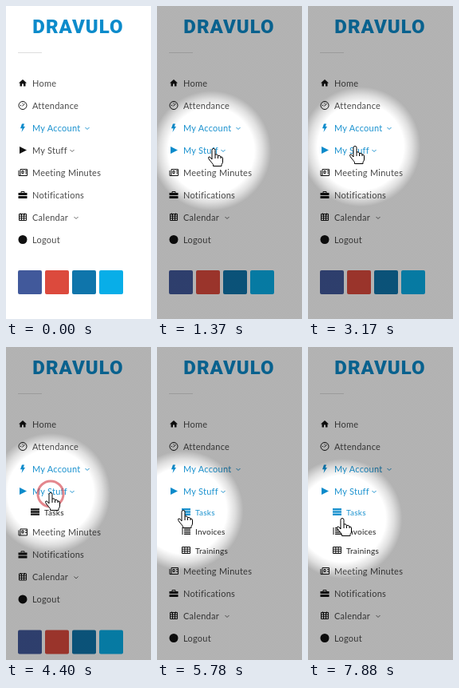
Animation, 182 px wide and 392 px high, one loop 8000 ms. Source, as an HTML page:

```html
<!DOCTYPE html>
<html lang="en">
<head>
<meta charset="utf-8">
<title>Side menu</title>
<style>
  html, body { margin: 0; height: 100%; overflow: hidden; background: #fff; }
  svg { display: block; width: 182px; height: 392px; }
  text { font: 11px Lato, sans-serif; letter-spacing: .25px; }
  .brand { font: 900 24px Roboto, sans-serif; letter-spacing: 1px; fill: #0c8bcb; text-anchor: middle; }
  .row { fill: #4a4a4a; color: #111; }
  .sub { fill: #222; }
  .sub text { font-size: 10px; }
  .row.on { fill: #1b92cf; color: #0c8bcb; }
  .icon { fill: currentColor; }
  .line { fill: none; stroke: currentColor; }
  .chevron { fill: none; stroke: #666; }
  .on .chevron { stroke: #1b92cf; }
</style>
</head>
<body>
<svg viewBox="0 0 182 392">
  <defs>
    <clipPath id="fold"><rect id="foldBox" y="195" width="182" height="0"/></clipPath>
    <radialGradient id="spot" gradientUnits="userSpaceOnUse" r="75">
      <stop offset=".72" stop-opacity="0"/>
      <stop offset=".86" stop-opacity=".42"/>
      <stop offset="1"/>
    </radialGradient>
  </defs>
  <text class="brand" x="90.500" y="34">DRAVULO</text>
  <path d="M15 58.5H45" stroke="#ddd"/>
  <g id="upper"></g>
  <g id="submenu" clip-path="url(#fold)"></g>
  <g id="lower"></g>
  <rect id="shade" width="182" height="392" fill="url(#spot)"/>
  <circle id="ring" fill="none" stroke="#d9545c" stroke-width="3"/>
  <g id="hand" stroke="#000" stroke-linejoin="round">
    <path fill="#fff" d="M-2 13V1.5a2 2 0 0 1 4 0V7q3-1 3.5 1.5q3-1 3.5 1.5q2.5-.5 2.5 2V16q0 2-1.5 3.5v2H-.5v-2q-1.5-2-4.5-5.5q-2.5-3-1-4q1.5-1 4 3z"/>
    <path d="M2 7v5M5.5 8.5v3.5M9 10v2"/>
  </g>
</svg>
<script>
const LOOP = 8000, ROW = 28, SUB_ROW = 24, MOVE = 300, LAG = 100;
const $ = id => document.getElementById(id);
const solid = d => `<path class="icon" d="${d}"/>`;
const line = d => `<path class="line" d="${d}"/>`;
const disc = (r, kind) => `<circle class="${kind}" r="${r}"/>`;

// Stacked horizontal bars, and a table of 3 by 3 cells
const bars = (count, gap, h, x = -5.5) => Array.from({ length: count }, (_, i) =>
  solid(`M${x} ${(i - (count - 1) / 2) * gap - h / 2}H5.5v${h}H${x}z`)).join('');
const grid = (w, h) => [-.5, -1 / 6, 1 / 6, .5].map(k =>
  line(`M${-w / 2} ${k * h}h${w}M${k * w} ${-h / 2}v${h}`)).join('');

const icons = {
  home: solid('M-5 0L0-4.5 5 0H3.5V4H1V1H-1V4H-3.5V0z'),
  dial: disc(5, 'line') + line('M-.7 1L2.5-2.2M-3 0h1M0-3v1'),
  bolt: solid('M-1-5H2L.8-1.5H3L-1.5 5.5-.5 .8H-3z'),
  play: solid('M-4-4.5L5 0-4 4.5z'),
  news: line('M-3-4H5.5V4H-5V-2.5M-3-4V4M-1-2h2v3h-2zM3-2H5M3 .5H5'),
  bag: solid('M-5.5-2.5h11v3h-11zM-5.5 1.5h11v3h-11z') + line('M-2-2.5V-4H2V-2.5'),
  calendar: grid(9, 8) + line('M-2.5-5V-3M2.5-5V-3'),
  badge: disc(5.5, 'icon'),
  tasks: bars(3, 3.2, 2.3),
  list: bars(4, 2.5, 1.4, -2.5) + line('M-4.5-4.5V4.5'),
  table: grid(10, 8)
};

function row(y, [label, icon, { chevron, on, id = '' } = {}], sub) {
  return `<g class="row ${sub ? 'sub' : ''} ${on ? 'on' : ''}" id="${id}">
    <g transform="translate(${sub ? 36.5 : 21} ${y - .5})">${icons[icon]}</g>
    <text x="${sub ? 48 : 33}" y="${y + 4}">${label}</text>
    ${chevron ? `<path class="chevron" d="M${chevron - 2.5} ${y - 1}l2.5 2.5l2.5-2.5"/>` : ''}</g>`;
}
const menu = (top, gap, items, sub) =>
  items.map((item, i) => row(top + gap * i, item, sub)).join('');

$('upper').innerHTML = menu(97, ROW, [
  ['Home', 'home'],
  ['Attendance', 'dial'],
  ['My Account', 'bolt', { chevron: 102, on: true }],
  ['My Stuff', 'play', { chevron: 83, id: 'stuff' }]
]);
$('submenu').innerHTML = menu(207, SUB_ROW, [
  ['Tasks', 'tasks', { id: 'tasks' }],
  ['Invoices', 'list'],
  ['Trainings', 'table']
], true);
$('lower').innerHTML = menu(209, ROW, [
  ['Meeting Minutes', 'news'],
  ['Notifications', 'bag'],
  ['Calendar', 'calendar', { chevron: 88 }],
  ['Logout', 'badge']
]) + ['#41599b', '#dc4a3d', '#0f75ab', '#08aee8'].map((color, i) =>
  `<rect x="${15 + 34 * i}" y="331" width="30" height="30" rx="2" fill="${color}"/>`).join('');

// Pointer stops: arrival time, x, y
const stops = [
  [0, 59, 188], [1370, 71, 179], [1700, 83, 179], [2370, 53, 182], [2800, 88, 177],
  [3170, 59, 176], [4130, 56, 183], [5210, 74, 200], [5700, 33, 205],
  [6300, 74, 207], [6650, 61, 207], [7500, 77, 213], [7800, 43, 215]
];

const clamp = v => Math.min(1, Math.max(0, v));
const swing = p => .5 - Math.cos(clamp(p) * Math.PI) / 2;

// Rests at each stop, then eases into the next one
function pointAt(t) {
  let [, x, y] = stops[0];
  for (const [arrival, toX, toY] of stops) {
    const p = swing((t - arrival) / MOVE + 1);
    x += (toX - x) * p;
    y += (toY - y) * p;
  }
  return [x, y];
}

function set(id, attrs) {
  for (const name in attrs) $(id).setAttribute(name, attrs[name]);
}

function draw(now) {
  const t = now % LOOP;
  const [x, y] = pointAt(t);
  const [cx, cy] = pointAt(t - LAG);
  const open = 3 * SUB_ROW * swing((t - 4285) / 300);
  const click = (t - 4130) / 270;

  set('hand', { transform: `translate(${x} ${y})`, opacity: t < 20 ? 0 : 1 });
  set('spot', { cx, cy });
  set('shade', { opacity: .3 * clamp(t / 830) });
  set('foldBox', { height: open });
  set('lower', { transform: `translate(0 ${open})` });
  set('ring', { cx: x, cy: y + 1, r: Math.max(0, 4 + 12 * click),
    opacity: click >= 0 && click < 1.9 ? clamp(1.1 - .4 * click) : 0 });
  $('stuff').classList.toggle('on', t > 900 && y < 186 || open > 0);
  $('tasks').classList.toggle('on', y > 195);
  requestAnimationFrame(draw);
}
draw(0);
</script>
</body>
</html>
```
